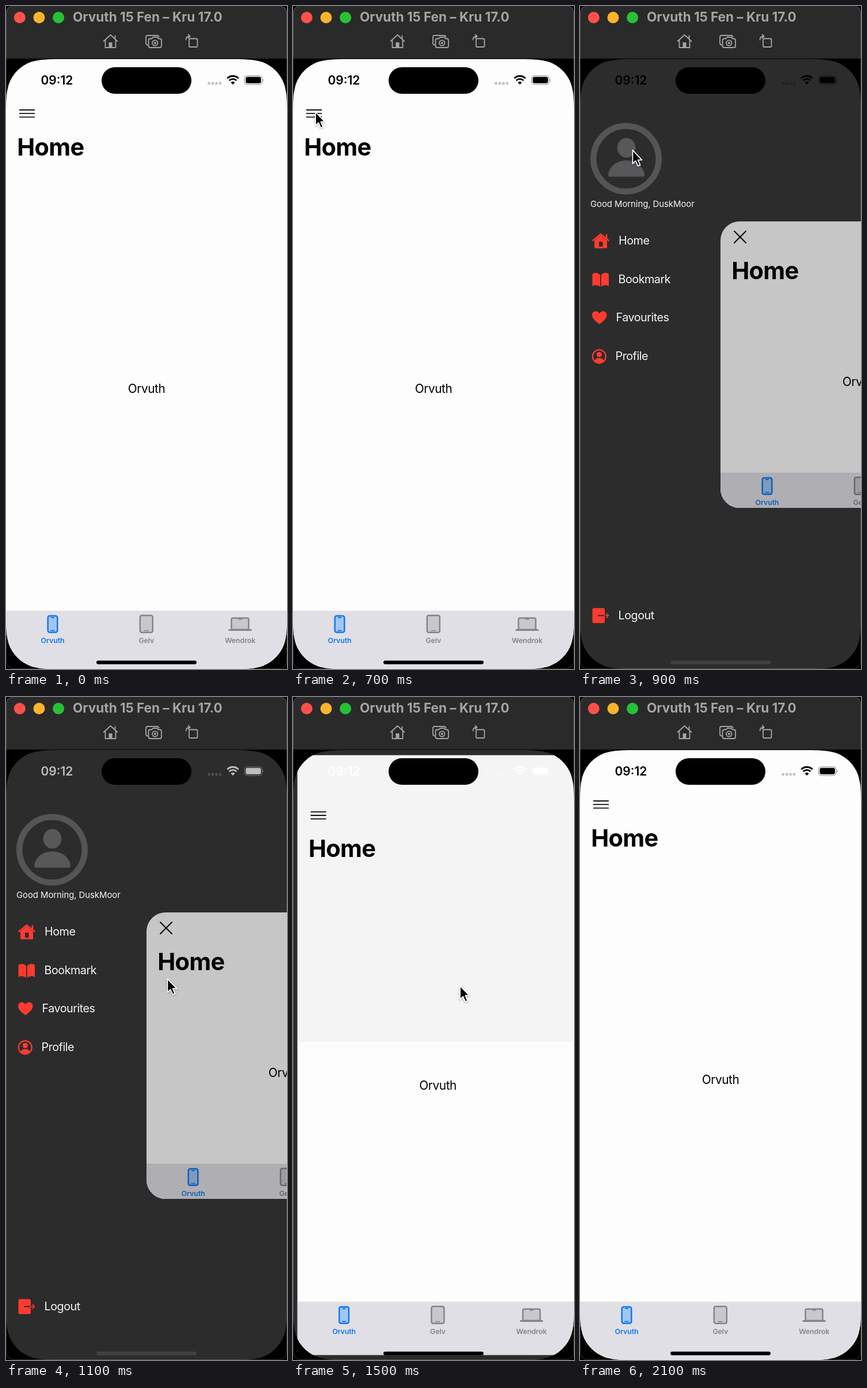
An HTML page that plays this animation: 488x1148 px, repeating every 2200 ms.

```html
<!DOCTYPE html>
<html lang="en">
<head>
<meta charset="utf-8">
<title>Side menu</title>
<style>
  html, body { margin: 0; width: 100%; height: 100%; overflow: hidden; background: #000; }
  svg { display: block; width: 100vw; height: 100vh; font-family: Inter, "Liberation Sans", sans-serif; }
  .line { fill: none; stroke-linecap: round; stroke-linejoin: round; }
  .menu text { font-size: 19.8px; letter-spacing: -.5px; fill: #f6f6f6; }
  .tabs text { font-size: 12.4px; font-weight: 600; text-anchor: middle; letter-spacing: -.1px; }
  .tabs .off { stroke: #858489; fill: #c8c7cc; }
  .tabs text.off { stroke: none; fill: #858489; }
  #pointer { filter: drop-shadow(0 1.5px 1.5px rgba(0, 0, 0, .35)); }
</style>
</head>
<body>
<svg viewBox="0 0 488 1148" preserveAspectRatio="none">
  <defs>
    <clipPath id="screenClip"><path id="screenShape"/></clipPath>
    <clipPath id="sheetClip"><rect id="sheetShape" width="600"/></clipPath>
  </defs>

  <!-- window -->
  <rect width="488" height="1148" fill="#000"/>
  <path d="M0 91V13Q0 0 13 0H475Q488 0 488 13V91Z" fill="#2a2a2a"/>
  <rect y="90.5" width="488" height="1.2" fill="#151515"/>
  <circle cx="23.8" cy="20" r="10" fill="#ff5049"/>
  <circle cx="57.5" cy="20" r="10" fill="#fdb32b"/>
  <circle cx="91.1" cy="20" r="10" fill="#27c234"/>
  <text x="116" y="27.3" font-size="22.5" font-weight="700" fill="#a5a5a5">Orvuth 15 Fen – Kru 17.0</text>
  <g class="line" stroke="#a5a5a5" stroke-width="1.8">
    <path d="M169.5 61L181.5 50L193.5 61M172.500 59.500V72H190.500V59.500M189.500 56V51.500"/>
    <rect x="178.5" y="63" width="6" height="9" fill="#a5a5a5" stroke="none"/>
    <path d="M246 67.500Q243 67 243 64V54Q243 51 246 51H262Q265 51 265.500 53.500"/>
    <path d="M250.500 56.500H253.500L255.500 54H262.500L264.500 56.500H267Q270 56.500 270 59.500V69Q270 72 267 72H250.500Q247.500 72 247.500 69V59.500Q247.500 56.500 250.500 56.500Z"/>
    <circle cx="258.8" cy="64" r="4.7"/><circle cx="258.8" cy="64" r="1.2"/>
    <rect x="318" y="56.5" width="14.5" height="14.5" rx="2"/>
    <path d="M312.500 58.500Q312.500 52.500 319 52.500M316.500 49.500L319.700 52.500L316.500 55.500"/>
  </g>

  <!-- device screen -->
  <g clip-path="url(#screenClip)">
    <rect y="92" width="488" height="1056" fill="#2c2c2c"/>
    <g id="menu" class="menu">
      <circle cx="80" cy="264.5" r="56.7" fill="none" stroke="#555557" stroke-width="10.5"/>
      <g fill="#58585a">
        <ellipse cx="80.5" cy="245.5" rx="15.8" ry="17"/>
        <path d="M52 295.500Q48 295 49.500 289C53 276 65 267.500 80.500 267.500S108 276 111.500 289Q113 295 109 295.500Z"/>
      </g>
      <text x="18" y="348.2" style="font-size:14.9px;letter-spacing:-.05px">Good Morning, DuskMoor</text>
      <text x="67" y="412.7">Home</text>
      <text x="66.5" y="480.2">Bookmark</text>
      <text x="62.5" y="546.2">Favourites</text>
      <text x="61.5" y="613.4">Profile</text>
      <text x="66.5" y="1062.2">Logout</text>
      <g fill="#ff3b30">
        <path d="M25 406L36 397L47 406V418Q47 419.500 45.500 419.500H26.500Q25 419.500 25 418Z"/>
        <path d="M22.500 406L36 395L49.500 406M46 402V396" class="line" stroke="#ff3b30" stroke-width="2.6"/>
        <rect x="33" y="408" width="6.5" height="8.5" fill="#2c2c2c"/>
        <path d="M35 465.500Q28 459.500 21.500 464V485Q28 481 35 486ZM36.700 465.500Q43.500 459.500 50 464V485Q43.500 481 36.700 486Z"/>
        <path d="M33.700 551C28 546.500 21 541.500 21 535.500C21 528 30 526 33.700 532.500C37.500 526 46.500 528 46.500 535.500C46.500 541.500 39.500 546.500 33.700 551Z"/>
        <circle cx="33.3" cy="606.8" r="11.5" fill="none" stroke="#ff3b30" stroke-width="2.2"/>
        <circle cx="33.3" cy="603.5" r="4.6"/>
        <path d="M25 614.500Q27 609.500 33.300 609.500T41.600 614.500Q38 618.300 33.300 618.300T25 614.500Z"/>
        <rect x="21.5" y="1042.5" width="21.5" height="26" rx="3"/>
      </g>
      <path d="M31 1055.500H43" stroke="#2c2c2c" stroke-width="2"/>
      <path d="M43 1055.500H49.500M46 1052L49.500 1055.500L46 1059" class="line" stroke="#ff3b30" stroke-width="1.7"/>
    </g>

    <!-- sliding sheet -->
    <g clip-path="url(#sheetClip)">
      <rect y="92" width="488" height="1056" fill="#fdfdfd"/>
      <g id="tabs" class="tabs">
        <rect width="500" height="110" fill="#e0dfe5"/>
        <g stroke="#0f78ee" stroke-width="2.5" fill="#a2c6f1">
          <rect x="72.7" y="9" width="16.6" height="28.5" rx="3"/>
          <path d="M79 12H83M78 34.300H84" stroke-width="1.8" stroke-linecap="round"/>
        </g>
        <text x="81" y="55.5" fill="#0f78ee">Orvuth</text>
        <rect class="off" x="232.8" y="8.3" width="22" height="29.5" rx="3" stroke-width="2.5"/>
        <path class="off" d="M239.500 34.500H248" stroke-width="1.6"/>
        <text class="off" x="243.8" y="55.5">Gelv</text>
        <rect class="off" x="391.5" y="12.7" width="30" height="20" rx="2.5" stroke-width="2.5"/>
        <path class="off" d="M386.500 33.500H426.500" stroke-width="3.2"/>
        <path class="off" d="M403.500 14H410" stroke-width="2.8"/>
        <text class="off" x="406.5" y="55.5">Wendrok</text>
      </g>
      <text id="label" text-anchor="middle" font-size="20.8" letter-spacing="-.4">Orvuth</text>
      <rect id="dim" width="488" height="496"/>
      <g id="nav">
        <path id="bars" d="M23 21H50M23 27.200H50M23 33.400H50" stroke="#111" stroke-width="1.8"/>
        <path id="cross" d="M24 17L44 37M44 17L24 37" class="line" stroke="#000" stroke-width="2"/>
        <text x="19.3" y="99.5" font-size="41.5" font-weight="700" letter-spacing="-.7">Home</text>
      </g>
    </g>
  </g>
  <rect x=".5" y="-.5" width="487" height="1148" rx="13" fill="none" stroke="#fff" stroke-opacity=".2"/>

  <!-- status bar -->
  <rect x="166" y="106" width="156" height="46" rx="23"/>
  <g id="status">
    <text x="60.5" y="136" font-size="21" font-weight="600">09:12</text>
    <path d="M352.500 134H373" stroke="currentColor" stroke-width="4.8" stroke-linecap="round" stroke-dasharray="0 6.5" opacity=".24"/>
    <path d="M394 136L390.300 132.300Q394 129 397.700 132.300Z"/>
    <path d="M387.700 129A8.900 8.900 0 0 1 400.300 129M384.300 125.300A13.700 13.700 0 0 1 403.700 125.300" fill="none" stroke="currentColor" stroke-width="2.9"/>
    <rect x="414.3" y="120.8" width="30.5" height="15" rx="4.8" fill="none" stroke="currentColor" stroke-opacity=".4" stroke-width="1.2"/>
    <rect x="416.3" y="122.8" width="26.5" height="11" rx="3.2"/>
    <path d="M446.200 126Q448.500 128.300 446.200 130.600Z" opacity=".45"/>
  </g>
  <rect id="homeBar" x="157" y="1133.5" width="174" height="6.2" rx="3.1"/>

  <path id="pointer" d="M0 0V23.500L5.300 18.600L9.200 27.500L13.200 25.800L9.300 17H16.200Z" fill="#000" stroke="#fff" stroke-width="1.8" stroke-linejoin="round"/>
</svg>
<script>
const LOOP = 2200, STEP = 100;
const TOP = 92, BOTTOM = 1148, WIDTH = 488, HALF = WIDTH / 2;
const OPEN = 700, CLOSE = 1348;
const el = {};
document.querySelectorAll('[id]').forEach(node => el[node.id] = node);

// Rounded rectangle with continuous-curvature corners
function squircle(x, y, w, h, r) {
  const half = [[1.5287, 0], [1.0885, 0], [.8684, 0], [.6315, .0749], [.3728, .1691]];
  const points = [...half, ...half.map(([a, b]) => [b, a]).reverse()];
  const corner = (cx, cy, sx, sy) => {
    const list = sx === sy ? points : [...points].reverse();
    const [first, ...rest] = list.map(([a, b]) => `${cx + sx * a * r} ${cy + sy * b * r}`);
    return `${first}C${rest.join(' ')}`;
  };
  return 'M' + [corner(x, y, 1, 1), corner(x, y + h, 1, -1),
                corner(x + w, y + h, -1, -1), corner(x + w, y, -1, 1)].join('L') + 'Z';
}
el.screenShape.setAttribute('d', squircle(0, TOP, WIDTH, BOTTOM - TOP, 68));

const mix = (a, b, k) => a + (b - a) * k;
const gray = v => `rgb(${v},${v},${v})`;
const set = (node, attrs) => { for (const k in attrs) node.setAttribute(k, attrs[k]); };
const move = (node, x, y) => set(node, { transform: `translate(${x} ${y})` });

// Eased progress from 0 to 1 over a span that begins at start
function ease(t, start, span) {
  const u = Math.min(1, Math.max(0, (t - start) / span));
  return u * u * (3 - 2 * u);
}

function drawSheet(t) {
  const rise = ease(t, OPEN, 148);
  const open = rise - ease(t, CLOSE, 170);
  const shade = rise - ease(t, CLOSE + 52, 135);   // fades a little after the slide
  const docked = open < .5;
  const drop = docked ? 320 * open : 0;
  const x = HALF * open, top = TOP + 281 * open, bottom = BOTTOM - 279 * open;

  set(el.sheetShape, { x, y: top, height: bottom - top, rx: 33 * shade });
  move(el.menu, HALF * (rise - 1), 0);
  move(el.nav, x, top + (docked ? 67 + drop : 0));
  move(el.tabs, x, Math.min(bottom, BOTTOM - 40) - 61);
  set(el.label, { x: x + HALF, y: docked ? 670 + drop : 657.5 });
  set(el.dim, { x, y: top, opacity: .22 * shade });
  set(el.bars, { opacity: docked ? 1 : 0 });
  set(el.cross, { opacity: shade ** 3 });
  set(el.homeBar, { fill: gray(docked ? 0 : 65) });
}

function drawStatus(t) {
  const tone = gray(255 * (ease(t, OPEN + 200, 300) - ease(t, CLOSE + 152, 200)));
  set(el.status, { fill: tone, color: tone });
}

// The pointer visits the menu button, then the sheet
function drawPointer(t) {
  const arrive = ease(t, 400, 200), leave = ease(t, 800, 340);
  move(el.pointer, mix(mix(150, 39, arrive), 290, leave), mix(mix(330, 183.5, arrive), 500, leave));
  set(el.pointer, { visibility: t >= 400 && t < 1700 ? 'visible' : 'hidden' });
}

// Ten pictures a second
function tick() {
  const t = Math.floor(performance.now() % LOOP / STEP) * STEP;
  drawSheet(t);
  drawStatus(t);
  drawPointer(t);
  requestAnimationFrame(tick);
}
tick();
</script>
</body>
</html>
```
